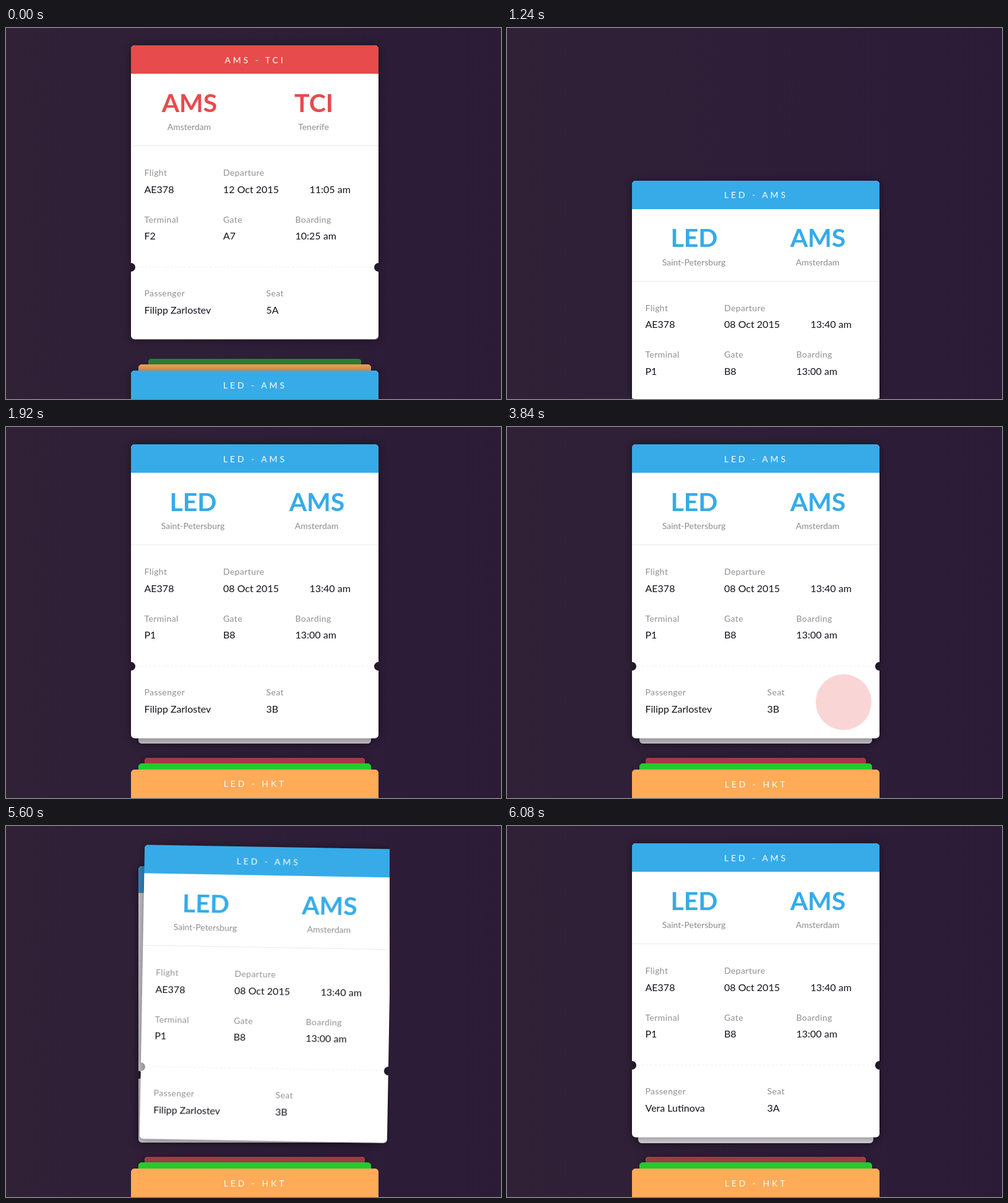
Write an HTML page that moves like this. It is 800 by 600 pixels and loops after 9600 ms.

```html
<!DOCTYPE html>
<html lang="en">
<head>
<meta charset="utf-8">
<title>Boarding passes</title>
<style>
  html, body { margin: 0; width: 100%; height: 100%; overflow: hidden; }
  body { background: linear-gradient(90deg, #302137, #2c1b37); }
  svg { display: block; width: 800px; height: 600px; }
  text { font-family: Lato, "Open Sans", sans-serif; }
  .raised { filter: drop-shadow(0 1px 7px rgba(0, 0, 0, .4)); }
  .title { font-size: 14px; letter-spacing: 3.9px; fill: #fff; text-anchor: middle; }
  .code { font-size: 41px; font-weight: 700; text-anchor: middle; }
  .city { font-size: 14px; fill: #8c8c8f; text-anchor: middle; }
  .label { font-size: 14px; letter-spacing: .4px; fill: #909093; }
  .value { font-size: 16px; fill: #14121d; }
</style>
</head>
<body>
<svg id="stage" viewBox="0 0 800 600">
  <defs>
    <clipPath id="deck"><rect x="180" y="20" width="440" height="519"/></clipPath>
  </defs>
</svg>
<script>
const LOOP = 9600, STEP = 40;
const RED = '#e74b4b', BLUE = '#36abe8', ORANGE = '#ffab58', GREEN = '#22cb2f';
const BODY = 'M208 28H596a6 6 0 0 1 6 6V380a7 7 0 0 0 0 14V497.5a6 6 0 0 1-6 6' +
  'H208a6 6 0 0 1-6-6V394a7 7 0 0 0 0-14V34a6 6 0 0 1 6-6Z';
const HEAD = 'M202 74V34a6 6 0 0 1 6-6H596a6 6 0 0 1 6 6V74Z';

const stage = document.getElementById('stage');

function add(parent, tag, attrs, content) {
  const el = document.createElementNS('http://www.w3.org/2000/svg', tag);
  for (const key in attrs) el.setAttribute(key, attrs[key]);
  if (content) el.textContent = content;
  return parent.appendChild(el);
}

function makeCard(color, title, info) {
  const holder = add(stage, 'g', {});
  const g = add(holder, 'g', { class: info ? 'raised' : 'flat' });
  const write = (kind, x, y, str, fill) =>
    add(g, 'text', fill ? { class: kind, x, y, fill } : { class: kind, x, y }, str);

  add(g, 'path', { d: BODY, fill: info ? '#fff' : color });
  add(g, 'path', { d: HEAD, fill: color });
  write('title', 402.5, 56.5, title);

  if (info) {
    info.route.forEach(([code, city, x]) => {
      write('code', x + .5, 135.5, code, color);
      write('city', x, 165, city);
    });
    add(g, 'path', { d: 'M202 190.5H602', stroke: '#e9e9eb' });
    add(g, 'path', { d: 'M210 386.5H594', stroke: '#f0f0f1', 'stroke-dasharray': '4 3' });
    [
      ['Flight', info.flight, 223.5, 239],
      ['Departure', info.date, 351, 239],
      ['', info.time, 490.5, 239],
      ['Terminal', info.terminal, 223.5, 314.5],
      ['Gate', info.gate, 351, 314.5],
      ['Boarding', info.boarding, 467.5, 314.5],
      ['Passenger', info.name, 223.5, 434],
      ['Seat', info.seat, 420.5, 434]
    ].forEach(([label, value, x, y]) => {
      if (label) write('label', x, y, label);
      write('value', x, y + 27.5, value);
    });
  }
  const shade = add(g, 'path', { d: BODY, fill: '#2e1f37', opacity: 0 });
  return { holder, g, shade };
}

const first = 'Filipp Zarlostev', second = 'Vera Lutinova';
const south = {
  route: [['AMS', 'Amsterdam', 296], ['TCI', 'Tenerife', 497]],
  flight: 'AE378', date: '12 Oct 2015', time: '11:05 am',
  terminal: 'F2', gate: 'A7', boarding: '10:25 am', name: first, seat: '5A'
};
const west = {
  route: [['LED', 'Saint-Petersburg', 302], ['AMS', 'Amsterdam', 502]],
  flight: 'AE378', date: '08 Oct 2015', time: '13:40 am',
  terminal: 'P1', gate: 'B8', boarding: '13:00 am', name: first, seat: '3B'
};

// Listed from back to front
const red = makeCard(RED, 'AMS - TCI', south);
const green = makeCard(GREEN, 'AMS - LED');
const orange = makeCard(ORANGE, 'LED - HKT');
const rear = makeCard(BLUE, 'LED - AMS', west);
const mate = makeCard(BLUE, 'LED - AMS', { ...west, name: second, seat: '3A' });
const blue = makeCard(BLUE, 'LED - AMS', west);
const pulse = add(stage, 'circle', { cx: 544, cy: 445, r: 45, fill: RED });

const clamp = v => Math.min(1, Math.max(0, v));
const easeOut = v => 1 - (1 - clamp(v)) ** 3;
const mix = (a, b, p) => a.map((v, i) => v + (b[i] - v) * p);
const show = (el, on) => el.setAttribute('visibility', on ? 'visible' : 'hidden');

// A pose is [top, scale, shade]
function place(card, [y, s, dim]) {
  card.g.setAttribute('transform', `translate(402 ${y}) scale(${s}) translate(-402 -28)`);
  card.shade.setAttribute('opacity', dim);
}

function draw(t) {
  const swap = t < 1000 ? 0 : easeOut((t - 990) / 987);
  place(red, mix([28, 1, 0], [535, .89, .38], swap));
  place(green, mix([535, .86, .43], [544, .94, 0], swap));
  place(orange, mix([544, .94, .08], [554, 1, 0], swap));
  const top = 554 - 526 * swap;

  const glow = (t - 3840) / 960;
  pulse.setAttribute('opacity', glow >= 0 && glow < 1 ? .23 * (1 - glow) : 0);

  const u = t - 5320;
  const grow = easeOut((u - 280) / 480);
  place(mate, mix([top + 37, .94, .28], [28, 1, 0], grow));

  const flying = u >= 0 && u < 760;
  place(blue, [top, 1, 0]);
  if (flying) {
    const k = ((u + 40) / 320) ** 4;
    blue.g.setAttribute('transform',
      `translate(${18 * k} ${5.8 * Math.sqrt(k)}) rotate(${k ** .8} 402 265.75)`);
    blue.holder.setAttribute('clip-path', 'url(#deck)');
  } else {
    blue.holder.removeAttribute('clip-path');
  }
  show(blue.holder, u < 720);

  show(rear.holder, u >= 480);
  place(rear, mix([80, .89, .3], [61.3, .95, .2], easeOut((u - 480) / 280)));
}

const start = performance.now();
function tick() {
  const t = (performance.now() - start) % LOOP;
  draw(Math.floor(t / STEP) * STEP);
  requestAnimationFrame(tick);
}
tick();
</script>
</body>
</html>
```
